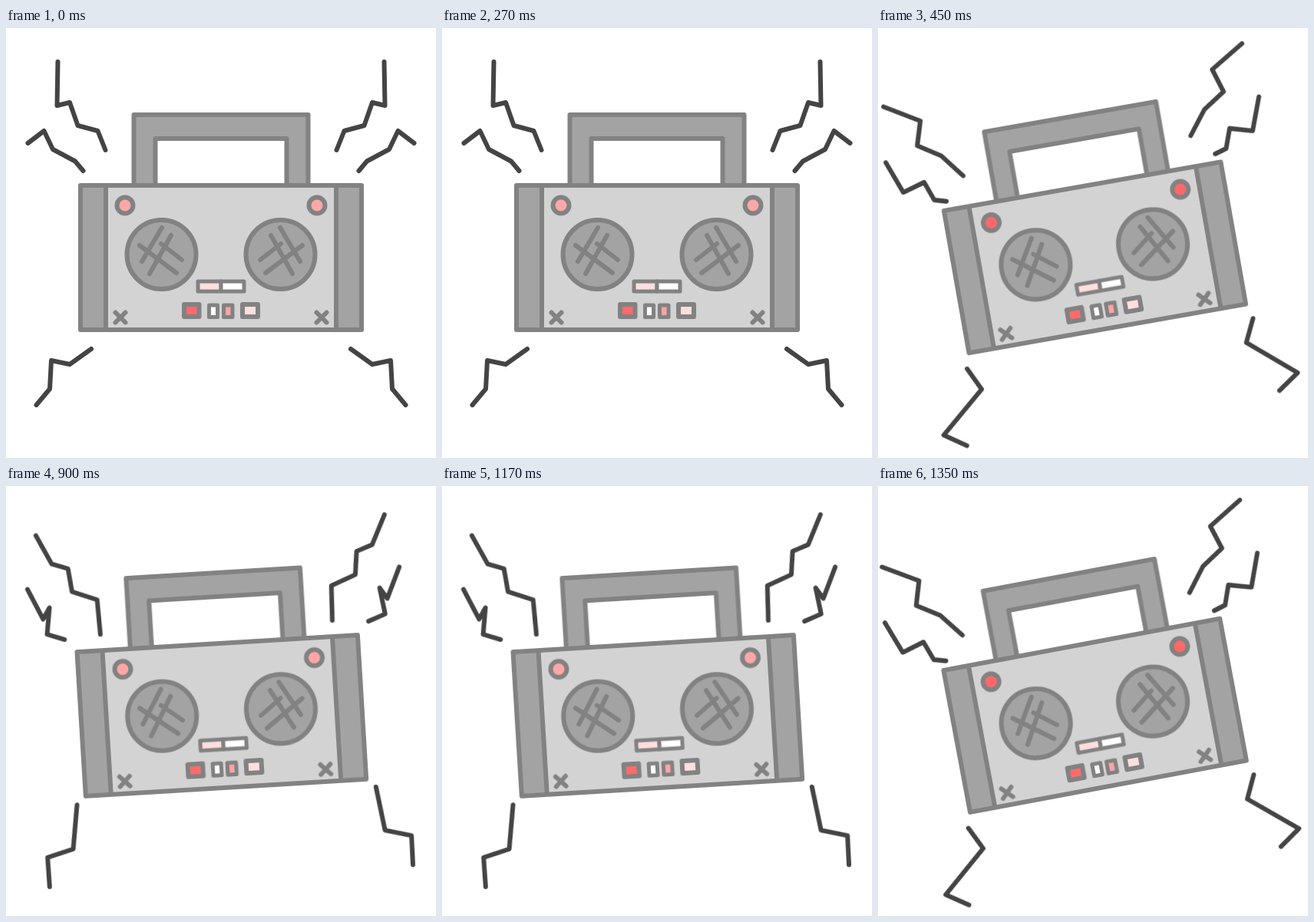
An HTML page that plays this animation: 560x560 px, repeating every 1.8 s.

```html
<!DOCTYPE html>
<html lang="en">
<head>
<meta charset="utf-8">
<title>Boombox</title>
<style>
  html, body { margin: 0; width: 100%; height: 100%; overflow: hidden; background: #fff; }
  svg { display: block; width: 100%; height: 100%; }
  svg * { stroke-linecap: round; stroke-linejoin: round; }
  #radio { stroke: #828282; stroke-width: 6; }
  .dark { fill: #a3a3a3; }
  .light { fill: #d3d3d3; }
  .line { fill: none; }
  .small { stroke-width: 5; }
  .bolts { fill: none; stroke: #444; stroke-width: 6; }
</style>
</head>
<body>
<!-- The origin is the point the boombox swings around. -->
<svg viewBox="-280 -285 560 560">
  <g id="radio">
    <path class="dark" d="M-113.500-80V-172H113.500V-80H85.500V-141H-85.500V-80Z"/>
    <rect class="dark" x="-183" y="-80" width="366" height="188"/>
    <rect class="light" x="-150" y="-80" width="300" height="188"/>
    <rect x="-30" y="45" width="30" height="13" fill="#ffdede" class="small"/>
    <rect x="0" y="45" width="30" height="13" fill="#fff" class="small"/>
    <rect x="-48" y="75" width="19.500" height="16" fill="#ff6b6b"/>
    <rect x="-15.500" y="76" width="11" height="15.500" fill="#fff" class="small"/>
    <rect x="3.500" y="76" width="11.500" height="15.500" fill="#ffa3a3" class="small"/>
    <rect x="28" y="75" width="20" height="16" fill="#ffdede"/>
  </g>
</svg>
<script>
const LOOP = 1800;
const angles = [0, -10, -3.45, -10.6];
const lampColors = ['#ffa6a6', '#ff6868', '#ffa6a6', '#ff6868'];

// Bolts on the right side; the left side is their mirror image.
const boltSets = [
  { steps: [0], d: `M212.500-241L213.500-184 197-188 186.500-158 160.500-151 150.500-126
    M251.500-135L230.500-151 219-127 190-111.500 179.500-99
    M169 133L197 153 221 148 223 185 240.500 206` },
  { steps: [1, 3], d: `M237-227L193-200.500 202.500-169.500 174-151 150.500-120.500
    M246.700-155L231-112.700 202-121 193-96 177.700-91.500
    M189 128L175 157.500 234-153`.replace('234-153', '234 207.700 206.700 226.500') },
  { steps: [2], d: `M227.400-234.500L209-196.300 188.300-189 184.800-158.800 152.800-146.200 151.300-101.200
    M242.500-165.300L224.500-125.300 215.400-139.700 220.500-105.200 198.300-97.100
    M195 118.700L203.400 175.800 237.400 184.900 237 223` },
];

function add(parent, tag, attrs) {
  const node = document.createElementNS('http://www.w3.org/2000/svg', tag);
  for (const key in attrs) node.setAttribute(key, attrs[key]);
  return parent.appendChild(node);
}

// Holds each value for an equal share of the loop.
function hold(node, prop, values) {
  const frames = [...values, values[values.length - 1]].map((value, i) =>
    ({ [prop]: value, offset: i / values.length, easing: 'step-end' }));
  node.animate(frames, { duration: LOOP, iterations: Infinity }).startTime = 0;
}

const radio = document.getElementById('radio');

for (const flip of [-1, 1]) {
  const side = add(radio, 'g', { transform: `scale(${flip} 1)` });
  add(side, 'circle', { class: 'dark', cx: 77.5, cy: 10, r: 45 });
  add(side, 'path', { class: 'line', d: 'M77-25L103 19M65-15L93 35M106-2L58 34M78-4L51 17' });
  add(side, 'path', { class: 'line', d: 'M124.500 85.500l13 13m0-13l-13 13' });
  const lamp = add(side, 'circle', { cx: 125, cy: -54, r: 10.5 });
  hold(lamp, 'fill', lampColors);
  for (const { steps, d } of boltSets) {
    const bolts = add(side, 'path', { class: 'bolts', d });
    hold(bolts, 'visibility', angles.map((_, i) => steps.includes(i) ? 'visible' : 'hidden'));
  }
}

hold(radio, 'transform', angles.map(a => `rotate(${a}deg)`));
</script>
</body>
</html>
```
